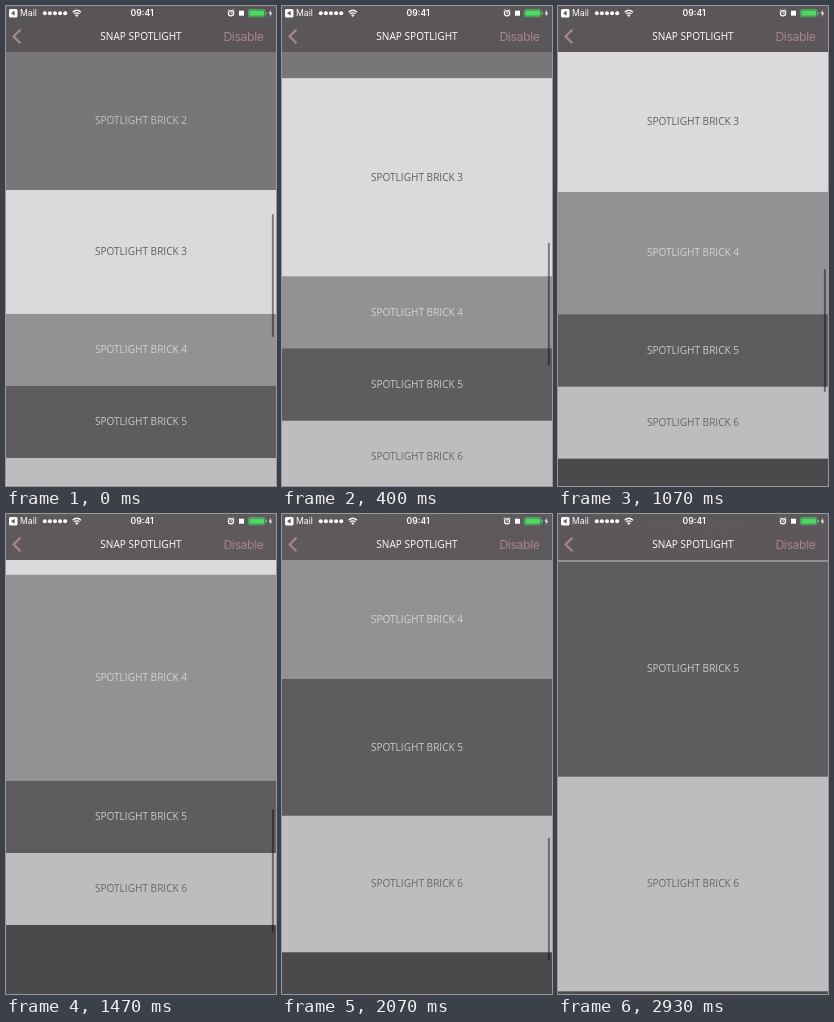
Recreate the animation shown at these times as an HTML page. Size 270 px wide and 480 px high, loop 3.07 s.

```html
<!DOCTYPE html>
<html lang="en">
<head>
<meta charset="utf-8">
<title>Snap spotlight</title>
<style>
  html, body { margin: 0; width: 100%; height: 100%; overflow: hidden; background: #4a494b; }
  svg { display: block; width: 270px; height: 480px; }
  text { font: 10.08px "Open Sans", "Noto Sans", sans-serif; }
  .mid { text-anchor: middle; }
  .status { font: 8.64px Inter, Roboto, sans-serif; }
  .action { font: 12.24px Inter, Roboto, sans-serif; letter-spacing: -.35px; }
</style>
</head>
<body>
<svg viewBox="0 0 270 480">
  <rect width="270" height="480" fill="#4a494b"/>
  <g id="bricks"></g>
  <rect id="bar" x="265.9" width="1.9" height="123" rx=".95" fill="#000" fill-opacity=".45"/>

  <rect width="270" height="46" fill="#595558" fill-opacity=".97"/>
  <g fill="#fff">
    <rect x="3" y="3" width="8.5" height="8.5" rx="1.5"/>
    <path d="M8.6 4.8 5 7.2l3.6 2.4z" fill="#595558"/>
    <text class="status" x="14" y="10.2">Mail</text>
    <g id="dots"></g>
    <g fill="none" stroke="#fff" stroke-width="1.3">
      <path d="M66.6 6.2Q70.8 2.4 75 6.2M68.2 8Q70.8 5.7 73.4 8"/>
    </g>
    <path d="M70.8 10.9 69.2 9.2Q70.8 8 72.4 9.2z"/>
    <text class="status mid" x="136" y="10.2" style="font-weight:600">09:41</text>
    <g fill="none" stroke="#fff">
      <circle cx="225" cy="7.2" r="2.6" stroke-width="1.2"/>
      <path d="M225 5.6v1.8h1.3M221.6 4.8l1.6-1.5M228.4 4.8l-1.6-1.5" stroke-width=".8"/>
    </g>
    <rect x="233" y="4.7" width="5" height="5"/>
    <rect x="242.4" y="3.6" width="16.6" height="7.2" rx="1.6" fill="none" stroke="#4cd964" stroke-width=".7"/>
    <rect x="243.4" y="4.6" width="14.6" height="5.2" rx=".8" fill="#4cd964"/>
    <rect x="259.7" y="5.9" width="1.1" height="2.6" rx=".5" fill="#4cd964"/>
    <path d="M265 3.8 262.6 7.6h1.7l-.7 3.1 2.6-4h-1.8z"/>
    <text class="mid" x="135" y="34" style="font-weight:500">SNAP SPOTLIGHT</text>
  </g>
  <path d="M14.4 23.6 7.6 30.4l6.8 6.8" fill="none" stroke="#a4848f" stroke-width="2.3"/>
  <text class="action" x="217.4" y="34.6" fill="#a4848f">Disable</text>
</svg>
<script>
const NAV = 46, SMALL = 72, LARGE = 216, LOOP = 3070, LAST = 44;
const FIRST = 2;
const colors = [ // fill, label
  ['#777679', '#c2c1c4'],
  ['#dad9db', '#626063'],
  ['#929194', '#d2d1d4'],
  ['#5e5c5f', '#c8c7ca'],
  ['#bdbcbf', '#69676a'],
];
const byId = id => document.getElementById(id);

byId('dots').innerHTML = [0, 1, 2, 3, 4]
  .map(i => `<circle cx="${38.8 + i * 5.1}" cy="7.2" r="2"/>`).join('');

byId('bricks').innerHTML = colors.map(([fill, ink], i) =>
  `<g><rect width="270" fill="${fill}"/>
   <text class="mid" x="135" fill="${ink}">SPOTLIGHT BRICK ${i + FIRST}</text></g>`).join('');
const bricks = [...byId('bricks').children];

// Drag speeds up until the peak, then the scroll glides to its resting place.
function flick(t, start, peak, end, from, mid, to, power) {
  if (t <= start) return from;
  if (t >= end) return to;
  return t < peak
    ? from + (mid - from) * ((t - start) / (peak - start)) ** 2
    : to - (to - mid) * ((end - t) / (end - peak)) ** power;
}

// Scroll position counted in bricks
function position(t) {
  if (t < 740) return flick(t, -1, 0, 708, 2, 2.361, 3, 2);
  if (t < 1700) return flick(t, 747, 1070, 1664, 3, 3.352, 4, 2);
  return flick(t, 1724, 2000, 2930, 4, 4.305, 4.9907, 3);
}

function draw(t) {
  const p = position(t), top = Math.floor(p), f = p - top;
  const visible = LARGE * (1 - f), grown = SMALL + (LARGE - SMALL) * f;
  const height = n =>
    n === top ? Math.max(SMALL, visible) :
    n === top + 1 || (top === 4 && n > top) ? grown : SMALL;

  let y = NAV + visible - height(top) - SMALL * (top - FIRST);
  bricks.forEach((brick, i) => {
    const h = height(i + FIRST), [rect, label] = brick.children;
    rect.setAttribute('y', y);
    rect.setAttribute('height', h);
    label.setAttribute('y', y + h / 2 + 3.1);
    y += h;
  });

  const bar = byId('bar');
  bar.setAttribute('y', 208 + (p - 2.361) * 55.5);
  bar.setAttribute('opacity', Math.min(1, Math.max(0, (2930 - t) / 260)));
}

// The picture advances 15 times a second and rests at the end.
function tick() {
  const t = performance.now() % LOOP;
  const n = Math.min(LAST, Math.floor((t + 3.4) * 15 / 1000));
  draw(Math.round(n * 20 / 3) * 10);
  requestAnimationFrame(tick);
}
tick();
</script>
</body>
</html>
```
